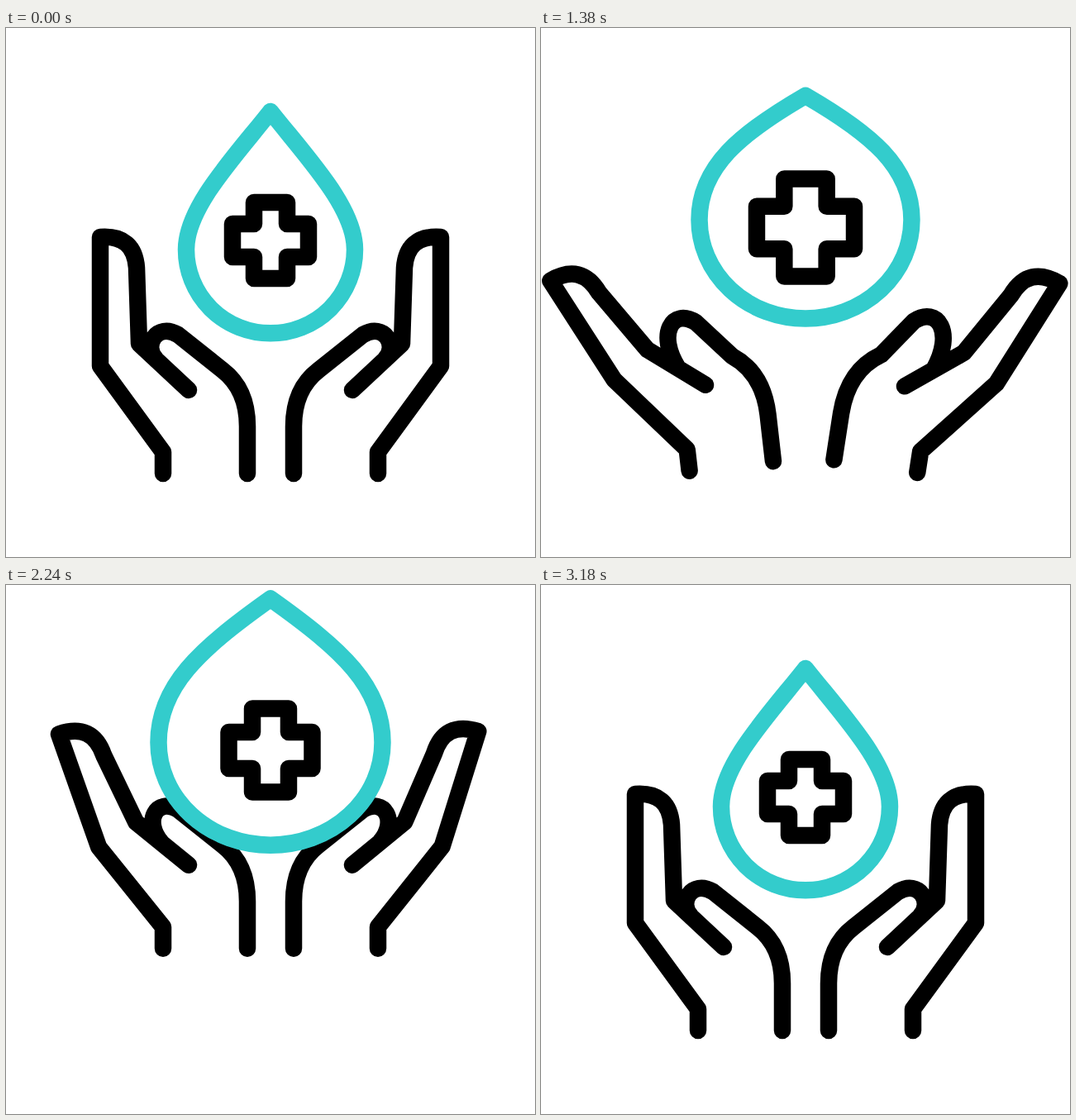
Animation, 640 px wide and 640 px high, one loop 3600 ms. Source, as an HTML page:

```html
<!DOCTYPE html>
<html lang="en">
<head>
<meta charset="utf-8">
<title>Hands and drop</title>
<style>
  html, body { margin: 0; width: 100%; height: 100%; overflow: hidden; background: #fff; }
  svg { display: block; width: 100vw; height: 100vh; }
  path { fill: none; stroke: #000; stroke-width: 20.5; stroke-linecap: round; stroke-linejoin: round; }
  #drop { fill: #fff; stroke: #33cccc; }
</style>
</head>
<body>
<svg viewBox="0 0 640 640">
  <path id="left"/>
  <path id="right" transform="translate(640) scale(-1 1)"/>
  <path id="drop"/>
  <path id="cross"/>
</svg>
<script>
const LOOP = 3600;
const HEART = [221, 438]; // middle of the palm, pivot of the hand
const el = id => document.getElementById(id);

// Eased value at time t from [time, value] keys
function ease(t, ...keys) {
  const next = keys.findIndex(key => t < key[0]);
  if (next === 0) return keys[0][1];
  if (next < 0) return keys[keys.length - 1][1];
  const [[t0, a], [t1, b]] = keys.slice(next - 1, next + 1);
  const u = (t - t0) / (t1 - t0);
  return a + (b - a) * u * u * (3 - 2 * u);
}

// turn tilts the whole hand, spread bends the fingers outward (1 = wide open)
function handPath(x, y, turn, spread) {
  const joint = (turnRate, spreadRate, grow = 0) => {
    const angle = -(6.5 * turnRate * turn + 13.5 * spreadRate * spread) * Math.PI / 180;
    const c = Math.cos(angle) * (1 + grow), s = Math.sin(angle) * (1 + grow);
    return (px, py) => {
      const dx = px - HEART[0], dy = py - HEART[1];
      return `${(x + dx * c - dy * s).toFixed(2)} ${(y + dx * s + dy * c).toFixed(2)} `;
    };
  };
  const wrist = joint(1, 0);
  const knuckle = joint(1, .27);
  const finger = joint(1, 1, .04 * spread);
  const base = joint(1, .27, -.2 * spread);
  const thumb = joint(-.35, 0, .12 * turn);
  const arch = joint(2.6, 0);
  const bow = joint(1.7, 0);
  return 'M' + wrist(190, 539) + 'L' + wrist(190, 513) + knuckle(114, 409) + finger(114, 253)
    + 'Q' + finger(155, 250) + finger(158, 290)
    + 'L' + knuckle(161, 382) + wrist(...HEART)
    + 'M' + base(181, 400) + 'C' + thumb(166, 385) + thumb(182, 356) + thumb(208, 371)
    + 'L' + arch(262, 414) + 'Q' + bow(292, 437) + wrist(292, 482)
    + 'L' + wrist(292, 539);
}

// The height and half width set the roundness of shoulders and belly
function dropPath(tip, height, rx) {
  const mid = tip + height, ry = .68 * rx + 32;
  const dx = 45 + 1.25 * (rx - 102), dy = .7 * height - 60;
  return `M320 ${tip} C${320 - dx} ${tip + dy} ${320 - rx} ${mid - rx / 2} ${320 - rx} ${mid}
    A${rx} ${ry} 0 0 0 ${320 + rx} ${mid}
    C${320 + rx} ${mid - rx / 2} ${320 + dx} ${tip + dy} 320 ${tip}Z`;
}

function crossPath(y, s) {
  const a = s * .435, b = s - a;
  return `M${320 - a} ${y - s}h${2 * a}v${b}h${b}v${2 * a}h${-b}v${b}h${-2 * a}v${-b}h${-b}v${-2 * a}h${b}Z`;
}

function draw() {
  const t = performance.now() % LOOP;
  const set = (id, d) => el(id).setAttribute('d', d);

  // Hands: sink while opening, toss, then settle while closing
  const lift = ease(t, [340, 0], [1090, 33], [1900, -100], [2200, -100], [3030, 0]);
  const turn = ease(t, [340, 0], [1000, 1], [1700, 1], [2200, 0]);
  const spread = ease(t, [340, 0], [1360, 1.45], [1900, 1.4], [3020, 0]);
  const x = HEART[0] - 22 * turn, y = HEART[1] + lift;
  set('left', handPath(x, y, turn, spread));
  set('right', handPath(x + turn, y + 1.5 * turn, 1.35 * turn, .9 * spread));

  // Drop: swells, flattens in flight, stretches on the way down
  const tip = ease(t, [1150, 101], [1900, 16], [2200, 16], [3040, 101]);
  const height = ease(t, [340, 167], [1100, 182], [1700, 112], [2240, 174],
    [2620, 121], [3040, 178], [3180, 167]);
  const rx = ease(t, [340, 102], [1100, 133], [1700, 123], [2240, 135.5], [3040, 102]);
  set('drop', dropPath(tip, height, rx));

  const sag = ease(t, [340, -11], [1040, 1], [1700, 17], [2620, 5], [3040, -11]);
  const size = ease(t, [340, 46], [1100, 64], [1700, 53], [3040, 46]);
  set('cross', crossPath(tip + height + sag, size));

  requestAnimationFrame(draw);
}
draw();
</script>
</body>
</html>
```
